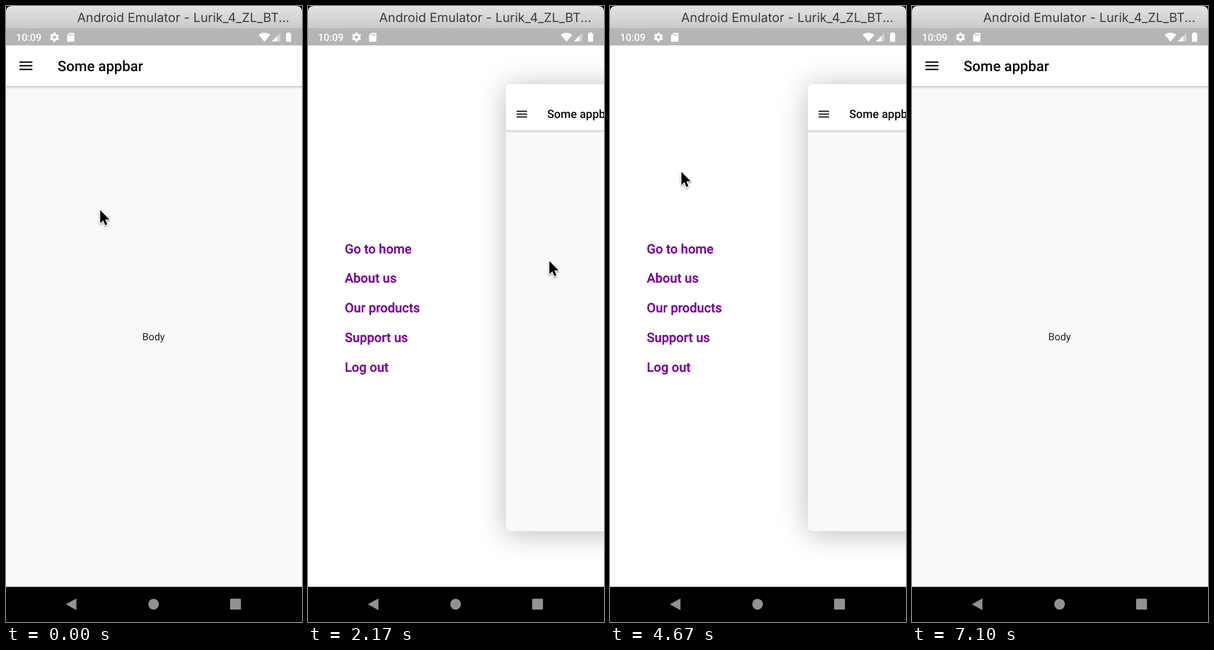
An HTML page that plays this animation: 519x1078 px, repeating every 7630 ms.

```html
<!DOCTYPE html>
<html lang="en">
<head>
<meta charset="utf-8">
<title>Sliding drawer</title>
<style>
html, body { margin: 0; width: 100%; height: 100%; overflow: hidden; background: #000; }
svg { display: block; width: 100%; height: 100%; }
text { font-family: Roboto, "Open Sans", sans-serif; text-rendering: geometricPrecision; }
.title { font: 400 22.2px Inter, "Open Sans", sans-serif; fill: #3d3d3d; }
.clock { font-size: 17.6px; font-weight: 500; fill: #fff; }
.link { font-size: 22.7px; font-weight: 500; fill: #770499; stroke: #770499; stroke-width: .35px; }
.heading { font-size: 25.2px; font-weight: 500; fill: #0c0c0c; }
.body { font-size: 17.66px; fill: #222; text-anchor: middle; }
</style>
</head>
<body>
<svg viewBox="0 0 519 1078" preserveAspectRatio="none">
  <defs>
    <linearGradient id="bar" x2="0" y2="1">
      <stop offset="0" stop-color="#e3e3e3"/>
      <stop offset="1" stop-color="#c9c9c9"/>
    </linearGradient>
    <linearGradient id="drop" x2="0" y2="1">
      <stop offset="0" stop-color="#000" stop-opacity=".25"/>
      <stop offset=".4" stop-color="#000" stop-opacity=".09"/>
      <stop offset="1" stop-color="#000" stop-opacity="0"/>
    </linearGradient>
    <filter id="soft" filterUnits="userSpaceOnUse" x="-140" y="-140" width="799" height="1258">
      <feGaussianBlur stdDeviation="32"/>
    </filter>
    <filter id="lift" x="-60%" y="-40%" width="220%" height="190%">
      <feDropShadow dx="0" dy="2" stdDeviation="1.6" flood-opacity=".4"/>
    </filter>
    <clipPath id="screen"><rect y="39" width="519" height="978"/></clipPath>
    <clipPath id="card"><rect id="cardEdge" width="519" height="978"/></clipPath>
  </defs>

  <path d="M0 39V10Q0 0 10 0H509Q519 0 519 10V39Z" fill="url(#bar)"/>
  <text class="title" x="124.8" y="28.3">Android Emulator - Lurik_4_ZL_BT...</text>

  <g clip-path="url(#screen)">
    <rect y="39" width="519" height="978" fill="#fff"/>
    <g id="menu"></g>
    <g id="panel">
      <rect y="5" width="519" height="978" fill="#000" opacity=".267" filter="url(#soft)"/>
      <g clip-path="url(#card)">
        <rect width="519" height="978" fill="#f9f9f9"/>
        <rect y="101" width="519" height="6" fill="url(#drop)"/>
        <rect width="519" height="101" fill="#fff"/>
        <path d="M23.5 59.3h22.8M23.5 65.6h22.8M23.5 71.9h22.8" stroke="#111" stroke-width="2.5"/>
        <text class="heading" x="90.5" y="74.6">Some appbar</text>
        <text class="body" x="258.8" y="546">Body</text>
      </g>
    </g>
  </g>

  <rect y="39" width="519" height="30" fill="#b5b5b5"/>
  <text class="clock" x="17.5" y="61">10:09</text>
  <g fill="none" stroke="#fff">
    <circle cx="85" cy="54.5" r="4.6" stroke-width="3.6"/>
    <circle cx="85" cy="54.5" r="7" stroke-width="2.4" stroke-dasharray="3.6 3.73" stroke-dashoffset="5.47"/>
  </g>
  <g fill="#fff">
    <path d="M111 47h7.5q1.5 0 1.5 1.5v12.5q0 1.5-1.5 1.5h-10q-1.5 0-1.5-1.5v-9.5z"/>
    <path d="M443 50.5Q453.2 43 463.4 50.5L453.2 62.5Z"/>
    <path d="M481 47V62H466Z" opacity=".4"/>
    <path d="M475.5 52.5V62H466Z"/>
    <path d="M493.5 46h4v1.8h2.5v14.7h-9v-14.7h2.5z"/>
  </g>
  <path d="M111.5 49v3.5M114.2 49v3.5M116.9 49v3.5" stroke="#b5b5b5" stroke-width="1.3"/>

  <rect y="1016.5" width="519" height="61.5" fill="#000"/>
  <g fill="#929292">
    <path d="M105 1047L123.5 1036.8V1057.2Z"/>
    <circle cx="258.8" cy="1046.8" r="9.4"/>
    <rect x="393" y="1037.3" width="19" height="19" rx="1.5"/>
  </g>

  <g id="cursor" filter="url(#lift)">
    <path d="M0 0V23.5L5.3 18.4L9 27L12.6 25.4L9 17H16.5Z" transform="translate(-.8 -1.8) scale(.98)"
      fill="#000" stroke="#fff" stroke-width="2.4" paint-order="stroke" stroke-linejoin="round"/>
  </g>
</svg>
<script>
const LOOP = 7630;
const SLIDE = 560;
const $ = id => document.getElementById(id);

$('menu').innerHTML = ['Go to home', 'About us', 'Our products', 'Support us', 'Log out']
  .map((label, i) => `<text class="link" x="64.5" y="${Math.round(432.6 + i * 51.75)}">${label}</text>`)
  .join('');

// Cursor stops: time, x, y.
const stops = [
  [0, 166, 359], [30, 166, 359], [770, 48, 117], [830, 49, 113],
  [1560, 49, 113], [2130, 424, 448],
  [2960, 424, 448], [3430, 48, 118], [3570, 31, 103],
  [4150, 31, 103], [4670, 126, 292], [5020, 74, 608], [5400, 384, 459],
  [6370, 384, 459], [6690, 545, 430]
];

const smooth = v => {
  const u = Math.min(1, Math.max(0, v));
  return u * u * (3 - 2 * u);
};
const ramp = (t, start) => smooth((t - start) / SLIDE);

// 0 = closed, 1 = open
const openness = t =>
  ramp(t, 1420) - ramp(t, 2740) + ramp(t, 4020) - ramp(t, 6102);

function cursorAt(t) {
  const i = stops.findIndex(s => s[0] > t);
  if (i < 0) return stops[stops.length - 1].slice(1);
  const [t0, x0, y0] = stops[i - 1];
  const [t1, x1, y1] = stops[i];
  const k = smooth((t - t0) / (t1 - t0));
  return [x0 + (x1 - x0) * k, y0 + (y1 - y0) * k];
}

function draw(t) {
  const p = openness(t);
  $('panel').setAttribute('transform',
    `translate(${347 * p} ${39 + 97.8 * p}) scale(${1 - 0.2 * p})`);
  $('cardEdge').setAttribute('rx', 9 * p);
  const [x, y] = cursorAt(t);
  $('cursor').setAttribute('transform', `translate(${x} ${y})`);
  $('cursor').setAttribute('visibility', t < 6700 ? 'visible' : 'hidden');
}

const begin = performance.now();
function tick() {
  draw((performance.now() - begin) % LOOP);
  requestAnimationFrame(tick);
}
tick();
</script>
</body>
</html>
```
